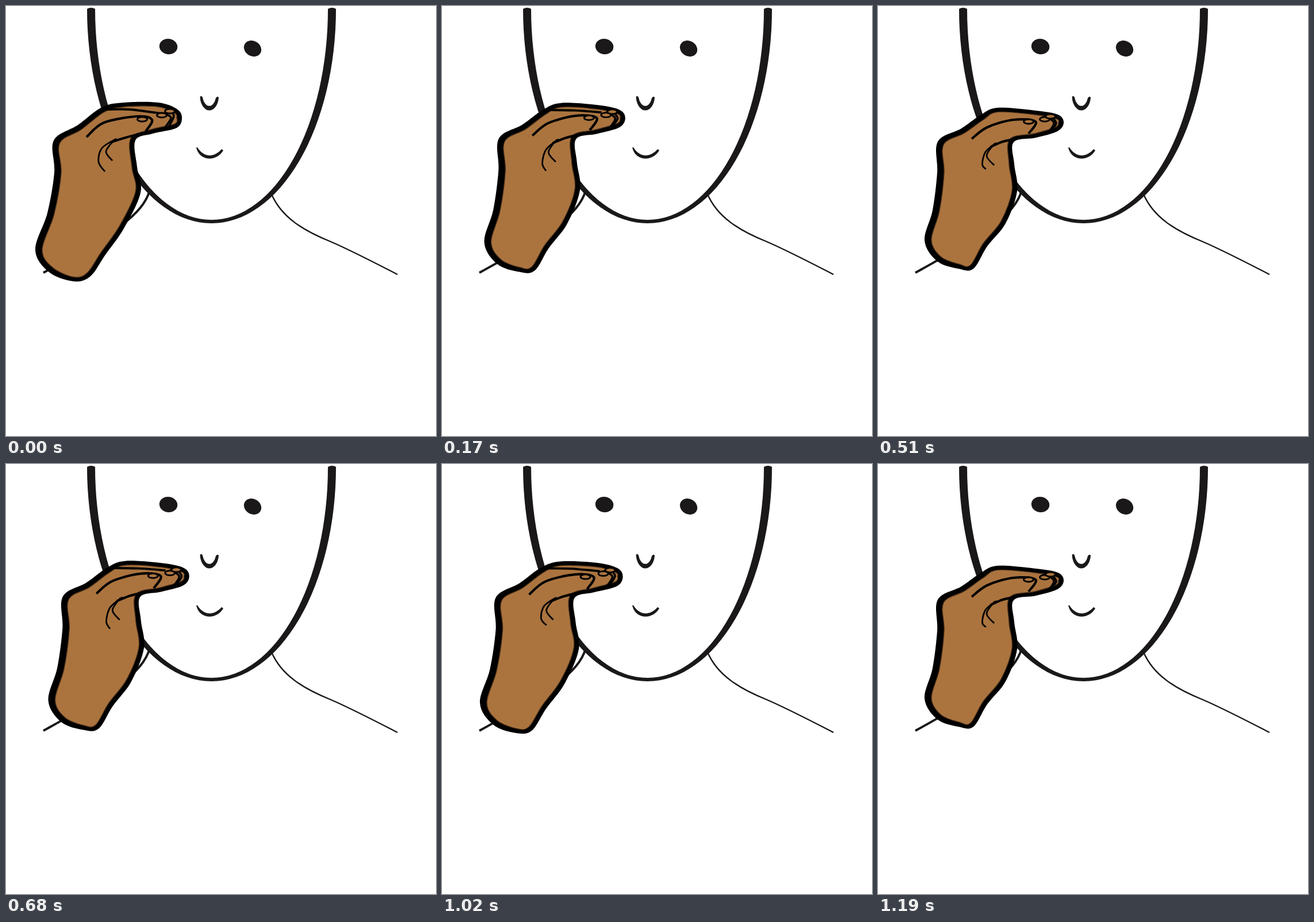
These frames come from a looping animation (748 by 748 pixels, 1360 ms). An HTML page:

```html
<!DOCTYPE html>
<html lang="en">
<head>
<meta charset="utf-8">
<title>Hand beside face</title>
<style>
html, body { margin: 0; width: 100%; height: 100%; overflow: hidden; background: #fff; }
svg { display: block; width: 100vw; height: 100vh; }
</style>
</head>
<body>
<svg id="stage" viewBox="0 0 748 748">
  <g fill="#1a1818">
    <path d="M141,5A216.5,373 0 0 0 574,5Q567,1 560,5A202.5,367 0 0 1 155,5Q148,1 141,5Z"/>
    <ellipse cx="282.5" cy="70.5" rx="15.8" ry="13.4" transform="rotate(10 282.5 70.5)"/>
    <ellipse cx="429" cy="74" rx="15.8" ry="13.2" transform="rotate(32 429 74)"/>
    <path d="M337.5,158Q340,155 342,159A12,20 0 0 0 365,160Q368,156 370,159A16.3,25 0 0 1 337.5,158Z"/>
    <path d="M331,246C336,270 366,272 378,251L375,249C362,264 344,264 333,246Z"/>
  </g>
  <g fill="none" stroke="#1a1818">
    <path stroke-width="2.4" d="M461,325C478,368 520,392 565,410C600,425 640,446 681,467"/>
    <path stroke-width="4" d="M250,321C238,362 190,395 65,464"/>
  </g>
  <g id="hand" stroke-linejoin="round"></g>
</svg>
<script>
const SKIN = "#ab743f";
const hand = document.getElementById("hand");
const parse = s => s.split(" ").map(p => p.split(",").map(Number));

// Each part is given for the hand drawn back and the hand reaching forward.
const part = (back, front, width) => ({ back: parse(back), front: parse(front), width });

const outline = part(
  "167,176 205,168 265,168 297,179 306,194 297,212 255,222 225,234 228,280 234,325 " +
  "205,387 172,434 147,470 118,479 75,463 51,424 72,360 84,290 83,234 125,207",
  "178,190 208,177 275,182 313,189 323,203 312,218 275,229 236,237 237,275 242,322 " +
  "222,378 190,418 166,457 140,457 103,444 81,408 95,355 103,290 104,236 145,213");
const strip = part("176,180 215,180 270,187", "183,189 235,190 280,192", 3.8);
const crease = part("192,231 167,247 161,271 172,288", "206,238 186,256 179,280 184,291", 2.8);
const nails = part("237,197 271,190 285,183", "262,201 290,197 300,192");
const lines = [
  part("140,228 170,203 228,192 254,198 243,218", "163,231 190,211 235,198 274,201 262,222", 4.2),
  part("272,187 287,194 276,212", "290,190 306,203 297,219", 3.6),
  part("283,181 292,191 283,210", "300,190 310,204 300,216", 3.6),
  part("235,222 208,229 182,237", "240,231 217,236 196,245", 4.2),
  part("188,233 174,253 185,269", "203,239 189,260 202,277", 2.8)
];

// Smooth curve through points
function curve(p, closed) {
  const n = p.length;
  const at = i => closed ? p[(i + n) % n] : p[Math.max(0, Math.min(n - 1, i))];
  let d = "M" + p[0];
  for (let i = 0; i < (closed ? n : n - 1); i++) {
    const [a, b, c, e] = [at(i - 1), at(i), at(i + 1), at(i + 2)];
    const c1 = b.map((v, k) => v + (c[k] - a[k]) / 6);
    const c2 = c.map((v, k) => v - (e[k] - b[k]) / 6);
    d += "C" + c1 + " " + c2 + " " + c;
  }
  return d + (closed ? "Z" : "");
}

// Move the outline inward; the ink is heaviest on the left side
function inset(p) {
  const n = p.length;
  return p.map(([x, y], i) => {
    const a = p[(i + n - 1) % n], b = p[(i + 1) % n];
    const len = Math.hypot(b[0] - a[0], b[1] - a[1]);
    const nx = (a[1] - b[1]) / len, ny = (b[0] - a[0]) / len;
    const w = 7 + (nx > 0 ? 5 : 2) * Math.abs(nx);
    return [x + nx * w, y + ny * w];
  });
}

// reach: 0 back, 1 forward; lift raises the fingers; curl shortens the crease
function drawHand({ reach, lift = 0, curl = 0 }) {
  const pose = ({ back, front }) => back.map(([x, y], i) => {
    const px = x + (front[i][0] - x) * reach;
    const py = y + (front[i][1] - y) * reach;
    return [px, py - lift * Math.max(0, 1 - py / 450)];
  });
  const stroke = (pts, w) =>
    `<path d="${curve(pts)}" fill="none" stroke="#000" stroke-width="${w}"/>`;

  const edge = pose(outline);
  const folded = pose(crease).map(([x, y], i) => [x + curl * i, y - 2 * curl * i]);
  const inked = reach < 1 ? [strip, ...lines] : lines;

  hand.innerHTML =
    `<path d="${curve(edge, true)}"/>` +
    `<path d="${curve(inset(edge), true)}" fill="${SKIN}" stroke="#4a3019" stroke-width="1.4"/>` +
    inked.map(l => stroke(pose(l), l.width)).join("") +
    stroke(folded, crease.width) +
    pose(nails).map(([x, y]) =>
      `<ellipse cx="${x}" cy="${y}" rx="8.5" ry="4" fill="${SKIN}" stroke="#000" stroke-width="2.8"/>`
    ).join("");
}

const STEP = 170;
const mid = { reach: 0.75, lift: 10 };
const poses = [
  { reach: 0 }, mid, { reach: 1 }, { reach: 1, curl: 1.2 },
  mid, { reach: 0, curl: 1.2 }, { reach: 0.5, lift: 5, curl: 1.2 }, { reach: 1, curl: 1.2 }
];

let shown;
function show(ms) {
  const i = Math.floor(ms / STEP) % poses.length;
  if (i !== shown) drawHand(poses[shown = i]);
}

let start;
function tick(t) {
  start ??= t;
  show(Math.max(0, t - start));
  requestAnimationFrame(tick);
}
show(0);
requestAnimationFrame(tick);
</script>
</body>
</html>
```
